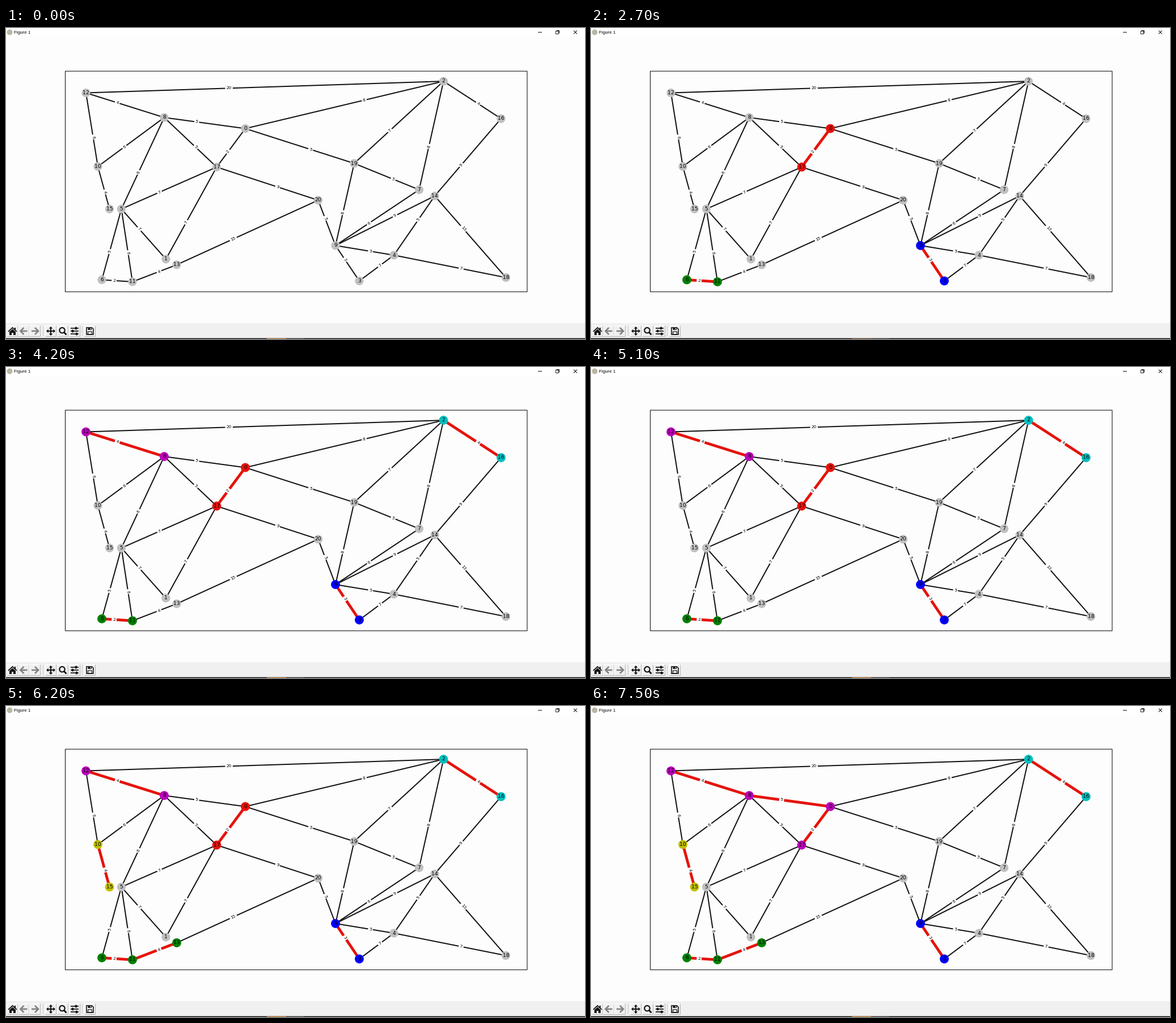
Animation, 1021 px wide and 549 px high, one loop 8000 ms. Source, as a matplotlib script:

```python
import math

import matplotlib.pyplot as plt
from matplotlib.animation import FuncAnimation
from matplotlib.patches import Circle, Polygon, Rectangle

W, H, DPI = 1021, 549, 64
PT = 72 / DPI  # points per pixel
STEP_MS, FRAMES = 100, 80
PICK_START, PICK_GAP, GLOW_MS = 85, 1015, 550

PAPER, SILVER, RED, INK = "#fdfdfd", "#c0c0c0", "#e5130b", "#111111"
TREE_COLORS = [RED, "#008000", "#0000fa", "#00bfbf", "#bb00bb", "#bfbf00"]

# node position by node number
NODES = [
    (422, 177.5), (282, 408), (771.5, 94), (623, 446.5), (684, 401),
    (203.5, 319.5), (169, 444.5), (728.5, 285.5), (279, 158), (581, 384),
    (162, 244.5), (223, 448), (141, 114.5), (301, 418), (756, 296.5),
    (182.5, 319.5), (873, 160), (371.5, 245.5), (881.5, 440.5), (614, 239),
    (550.5, 304),
]

# walks through the graph: node, weight, node, weight, node ...
WALKS = [
    (0, 5, 8, 4, 12, 6, 10, 4, 15),
    (0, 8, 2, 20, 12),
    (0, 2, 17, 7, 1, 7, 5, 6, 11, 2, 6),
    (0, 5, 19, 8, 9, 5, 20, 15, 13),
    (2, 7, 19, 5, 7, 6, 9, 9, 14),
    (2, 4, 16, 9, 14),
    (2, 8, 7),
    (3, 3, 9, 5, 4, 7, 18, 13, 14),
    (3, 7, 4, 5, 14),
    (8, 5, 17, 7, 5, 5, 6),
    (8, 6, 10),
    (8, 6, 5),
    (11, 4, 13),
    (17, 9, 20),
]
EDGES = {(u, v): weight for walk in WALKS
         for u, weight, v in zip(walk[::2], walk[1::2], walk[2::2])}


def kruskal(steps):
    """Return the chosen edges and the node colours after some steps."""
    tree, chosen, fresh = {}, [], iter(TREE_COLORS)
    for u, v in sorted(EDGES, key=lambda e: (EDGES[e], min(e))):
        if len(chosen) == steps:
            break
        old, new = tree.get(u), tree.get(v)
        if old and old == new:
            continue
        color = new or old or next(fresh)
        joined = {n for n, c in tree.items() if c in (old, new)} | {u, v}
        tree.update(dict.fromkeys(joined, color))
        chosen.append((u, v))
    return chosen, tree


fig = plt.figure(figsize=(W / DPI, H / DPI), dpi=DPI, facecolor=PAPER)
ax = fig.add_axes([0, 0, 1, 1])
ax.set_xlim(0, W)
ax.set_ylim(H, 0)
ax.axis("off")


def rect(x0, y0, x1, y1, fill="none", edge="none", width=0, z=1):
    return ax.add_patch(Rectangle((x0, y0), x1 - x0, y1 - y0, fc=fill, ec=edge,
                                  lw=width * PT, zorder=z, snap=False))


def line(points, color=INK, width=1.0, z=2):
    xs, ys = zip(*points)
    return ax.plot(xs, ys, color=color, lw=width * PT, zorder=z, snap=False,
                   solid_capstyle="butt", solid_joinstyle="miter")[0]


def disc(x, y, r, fill, edge="none", width=0, z=2):
    return ax.add_patch(Circle((x, y), r, fc=fill, ec=edge,
                               lw=width * PT, zorder=z))


def shape(points, fill=INK, edge="none", width=0, z=3):
    ax.add_patch(Polygon(points, closed=True, fc=fill, ec=edge,
                         lw=width * PT, zorder=z, snap=False))


def label(x, y, s, size, **style):
    style = {"ha": "center", "va": "center", "family": "DejaVu Sans",
             "color": "black", **style}
    ax.text(x, y, s, fontsize=size * PT, zorder=6, **style)


def draw_title_bar():
    rect(0, 0, W, 15, "white")
    disc(6.5, 7.5, 5, "#b9b6a4")
    label(14, 8, "Figure 1", 8, ha="left", family="Liberation Sans")
    line([(938, 7.5), (945, 7.5)])
    rect(969.5, 5.5, 974.5, 10.5, edge=INK, width=0.9)
    line([(971, 5.5), (971, 4.5), (975.5, 4.5), (975.5, 9), (974.5, 9)], width=0.9)
    line([(1001, 4.5), (1007, 10.5)])
    line([(1001, 10.5), (1007, 4.5)])


def draw_button(x):
    left, right, top, bottom = x - 9.5, x + 9.5, 525.5, 544.5
    line([(left, bottom), (left, top), (right, top)], "white")
    line([(left, bottom), (right, bottom), (right, top)], "#b4b4b4")


def draw_home(x, y):
    line([(x - 7.5, y + 1), (x, y - 6), (x + 7.5, y + 1)], width=1.8)
    rect(x + 3.5, y - 6, x + 5.5, y - 2, INK)
    shape([(x - 5.5, y + 1.5), (x, y - 3.5), (x + 5.5, y + 1.5), (x + 5.5, y + 7),
           (x + 1.5, y + 7), (x + 1.5, y + 3), (x - 1.5, y + 3),
           (x - 1.5, y + 7), (x - 5.5, y + 7)])


def draw_arrow(x, y, direction):
    grey = "#808080"
    line([(x - 6 * direction, y), (x + 5 * direction, y)], grey, 2.6)
    line([(x, y - 6), (x + 6 * direction, y), (x, y + 6)], grey, 2.6)


def draw_pan(x, y):
    line([(x - 6, y), (x + 6, y)], width=2)
    line([(x, y - 6), (x, y + 6)], width=2)
    for s in (-1, 1):
        tip, base = 8 * s, 4.5 * s
        shape([(x + tip, y), (x + base, y - 3.3), (x + base, y + 3.3)])
        shape([(x, y + tip), (x - 3.3, y + base), (x + 3.3, y + base)])


def draw_zoom(x, y):
    disc(x - 1, y - 1.3, 4.7, "none", INK, 2.1)
    line([(x + 2.5, y + 2.3), (x + 6.5, y + 6.5)], width=2.8)


def draw_sliders(x, y):
    for dy, knob in ((-5, 2.5), (0, -3.5), (5, 3.5)):
        line([(x - 7, y + dy), (x + 7, y + dy)], width=1.7)
        rect(x + knob - 1.6, y + dy - 2.3, x + knob + 1.6, y + dy + 2.3, INK)


def draw_save(x, y):
    shape([(x - 6, y - 6), (x + 3.5, y - 6), (x + 6, y - 3.5),
           (x + 6, y + 6), (x - 6, y + 6)], "none", INK, 1.6)
    rect(x - 3.5, y - 6, x + 3, y - 2, INK)
    rect(x + 0.3, y - 5.2, x + 1.8, y - 2.8, "#f0f0f0", z=3)
    rect(x - 3.5, y + 1, x + 3.5, y + 6, edge=INK, width=1.2)


def draw_toolbar():
    rect(0, 521, W, 548, "#f0f0f0", z=0)
    for x in (65.5, 134.5):
        line([(x, 526), (x, 544)], "#c8c8c8")
    for x, icon, *args in ((11.5, draw_home), (31.5, draw_arrow, -1),
                           (51, draw_arrow, 1), (79, draw_pan),
                           (100, draw_zoom), (121, draw_sliders),
                           (148, draw_save)):
        draw_button(x)
        icon(x, 535, *args)


def draw_edge(u, v, weight):
    (x0, y0), (x1, y1) = NODES[u], NODES[v]
    angle = math.degrees(math.atan2(y0 - y1, x1 - x0))
    label(x0 + 0.6 * (x1 - x0), y0 + 0.6 * (y1 - y0), str(weight), 7.2,
          rotation=(angle + 90) % 180 - 90,
          bbox=dict(boxstyle="round,pad=0.28", fc=PAPER, ec="none"))
    return line([(x0, y0), (x1, y1)])


draw_title_bar()
draw_toolbar()
rect(104.5, 76.2, 919, 465.7, edge="black", width=1)

edge_lines = {pair: draw_edge(*pair, weight) for pair, weight in EDGES.items()}
node_discs = [disc(x, y, 7.6, SILVER, z=4) for x, y in NODES]
for number, (x, y) in enumerate(NODES):
    label(x, y, str(number), 9.2)

rect(0, 547.6, W, H, "#0a0a0a", z=3)
rect(494, 548, 526, H, "#3c3c3c", z=4)
task_button = rect(460, 548, 494, H, z=4)


def update(frame):
    now = frame * STEP_MS
    chosen, tree = kruskal(math.floor((now - PICK_START) / PICK_GAP) + 1)
    for pair, artist in edge_lines.items():
        picked = pair in chosen
        artist.set(color=RED if picked else INK,
                   linewidth=(4.8 if picked else 2) * PT)
    for number, artist in enumerate(node_discs):
        artist.set(facecolor=tree.get(number, SILVER),
                   radius=7.9 if number in tree else 7.6)
    glowing = now % PICK_GAP < GLOW_MS
    task_button.set_facecolor("#d9822b" if glowing else "#7a4a20")
    return [*edge_lines.values(), *node_discs, task_button]


anim = FuncAnimation(fig, update, frames=FRAMES, interval=STEP_MS,
                     repeat=True, repeat_delay=0, blit=False)
plt.show()
```
